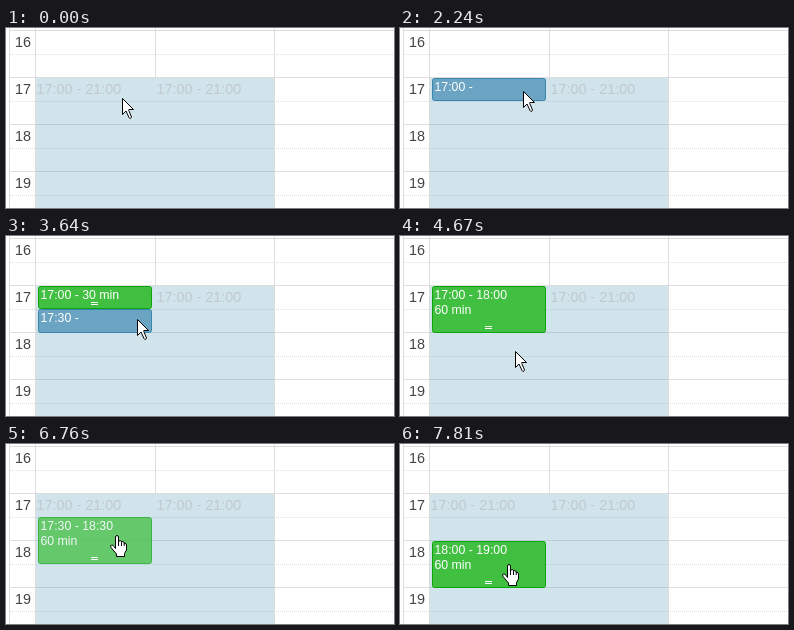
Recreate the animation shown at these times as an HTML page. Size 388 by 180 pixels, loop 8 s.

```html
<!DOCTYPE html>
<html>
<head>
<meta charset="utf-8">
<title>Calendar booking</title>
<style>
  html, body { margin: 0; width: 100%; height: 100%; overflow: hidden; background: #fff; }
  svg { display: block; width: 388px; height: 180px; }
  text { font: 14.4px "Liberation Sans", Arial, sans-serif; }
  .event text { font-size: 12.3px; fill: #fff; }
</style>
</head>
<body>
<svg viewBox="0 0 388 180">
  <g id="grid"></g>
  <path d="M30 50H268V180H30Z" fill="#66a5bc" fill-opacity=".3"/>
  <g fill="#c2c8d0">
    <text id="slot" x="30.5" y="66">17:00 - 21:00</text>
    <text x="150.5" y="66">17:00 - 21:00</text>
  </g>
  <g id="events"></g>
  <g id="cursor" stroke="#000" stroke-linejoin="round">
    <path id="arrow" fill="#fff"
      d="M.5 .5V16.5L4 13 7 19.5Q7.5 20.5 8.5 20.5L9.5 19 6.8 12.5V11.5H11.5Z"/>
    <g id="hand" transform="translate(-5 -1)">
      <path fill="#fff" d="M5.5 13.5V2Q5.7 .5 7 .5T8.5 2V7Q9 5.4 10.3 5.6T11.5 7V7.6Q12 6.3 13 6.5T14.2 8V8.8Q15 7.6 16 8.6L16.5 10V15L14.5 18.5V21.5H6.5V19L1 12.5Q0 10.5 1.5 10T4 11.5Z"/>
      <path fill="none" d="M8.5 7V11M11.5 7.5V11M14.2 8.5V11"/>
    </g>
  </g>
</svg>
<script>
const LOOP = 8000, HOUR = 47, TICK = 115;
const $ = id => document.getElementById(id);

function add(parent, tag, attrs, content = '') {
  const el = document.createElementNS('http://www.w3.org/2000/svg', tag);
  for (const key in attrs) el.setAttribute(key, attrs[key]);
  el.textContent = content;
  parent.append(el);
  return el;
}

const line = (d, attrs) => add($('grid'), 'path', { d, stroke: '#ddd', ...attrs });

for (let i = 0; i < 4; i++) {
  const y = 2.5 + HOUR * i;
  line(`M3 ${y}H388`);
  line(`M4 ${y + 24}H388`, { 'stroke-dasharray': '1 1' });
  add($('grid'), 'text', { x: 25, y: y + 16.5, 'text-anchor': 'end', fill: '#444' }, 16 + i);
}
for (const x of [3.5, 29.5, 268.5]) line(`M${x} 0V180`);
line('M149.5 0V50');

// Hours are decimal: 17.5 is 17:30
const topOf = hour => 50 + Math.floor((hour - 17) * HOUR);
const clock = hour => `${Math.floor(hour)}:${hour % 1 ? '30' : '00'}`;

function makeBox(start, length, fill, stroke, lines, opacity = 1) {
  const top = topOf(start), height = topOf(start + length) - top;
  const g = add($('events'), 'g', { class: 'event', opacity });
  add(g, 'rect', { x: 32.5, y: top + .5, width: 113, height: height - 1, rx: 2, fill, stroke });
  lines.forEach((text, i) => add(g, 'text', { x: 34.5, y: top + 13 + 15.4 * i }, text));
  return g;
}

const selection = start =>
  makeBox(start, .5, '#6ba3c3', '#3a87ad', [`${clock(start)} -`]);

function booking(start, length, opacity) {
  const lines = length < 1
    ? [`${clock(start)} - 30 min`]
    : [`${clock(start)} - ${clock(start + length)}`, '60 min'];
  const g = makeBox(start, length, '#41bf41', '#0ca50c', lines, opacity);
  add(g, 'path', { d: `M85 ${topOf(start + length) - 6.5}h7m-7 2h7`, stroke: '#fff' });
  return g;
}

const DRAGGED = .75;
const grabbed = 6530, dropped = 7690;

// Each event with the span of time in which it is shown
const events = [
  [2240, 2360, selection(17)],
  [2360, 3750, booking(17, .5)],
  [3640, 3750, selection(17.5)],
  [3750, grabbed, booking(17, 1)],
  [grabbed, 6760, booking(17, 1, DRAGGED)],
  [6760, 7120, booking(17.5, 1, DRAGGED)],
  [7120, dropped, booking(18, 1, DRAGGED)],
  [dropped, LOOP, booking(18, 1)]
];

// Pointer strokes: first and last step, midway point, end point
const strokes = [
  { from: 570, to: 800, via: [112, 64], end: [106, 60] },
  { from: 1130, to: 1620, via: [113, 56], end: [122, 63] },
  { from: 1980, to: 1980, via: [122, 63], end: [123, 63] },
  { from: 2810, to: 3290, via: [125, 56], end: [131, 83] },
  { from: 4210, to: 4670, via: [123, 101], end: [115, 115] },
  { from: 5530, to: 5740, via: [118, 113], end: [120, 111] },
  { from: 5980, to: 5980, via: [118, 106], end: [117, 101] },
  { from: 6080, to: 6760, via: [112, 74], end: [109, 92] },
  { from: 6880, to: 7480, via: [109, 108], end: [107, 121] }
];
const handSpans = [[2810, 3150], [4000, 4410], [6080, LOOP]];

const within = (t, [from, to]) => t >= from && t < to;
const show = (el, on) => el.setAttribute('visibility', on ? 'visible' : 'hidden');

// Parabola through a, b (midway) and c
const curve = (a, b, c, u) =>
  a * (1 - u) * (1 - 2 * u) + b * 4 * u * (1 - u) + c * u * (2 * u - 1);

function pointerAt(t) {
  let point = [116, 70];
  for (const { from, to, via, end } of strokes) {
    if (t < from) break;
    const gaps = Math.round((to - from) / TICK);
    const done = t >= to ? gaps : Math.floor((t - from) / (to - from) * gaps + .05);
    const u = (done + 1) / (gaps + 1);
    point = point.map((a, i) => Math.round(curve(a, via[i], end[i], u)));
  }
  return point;
}

function render(t) {
  for (const [from, to, el] of events) show(el, within(t, [from, to]));
  show($('slot'), !within(t, [2240, grabbed]));
  const hand = handSpans.some(span => within(t, span));
  show($('hand'), hand);
  show($('arrow'), !hand);
  $('cursor').setAttribute('transform', `translate(${pointerAt(t)})`);
}

const begin = performance.now();
function frame() {
  render((performance.now() - begin) % LOOP);
  requestAnimationFrame(frame);
}
frame();
</script>
</body>
</html>
```
